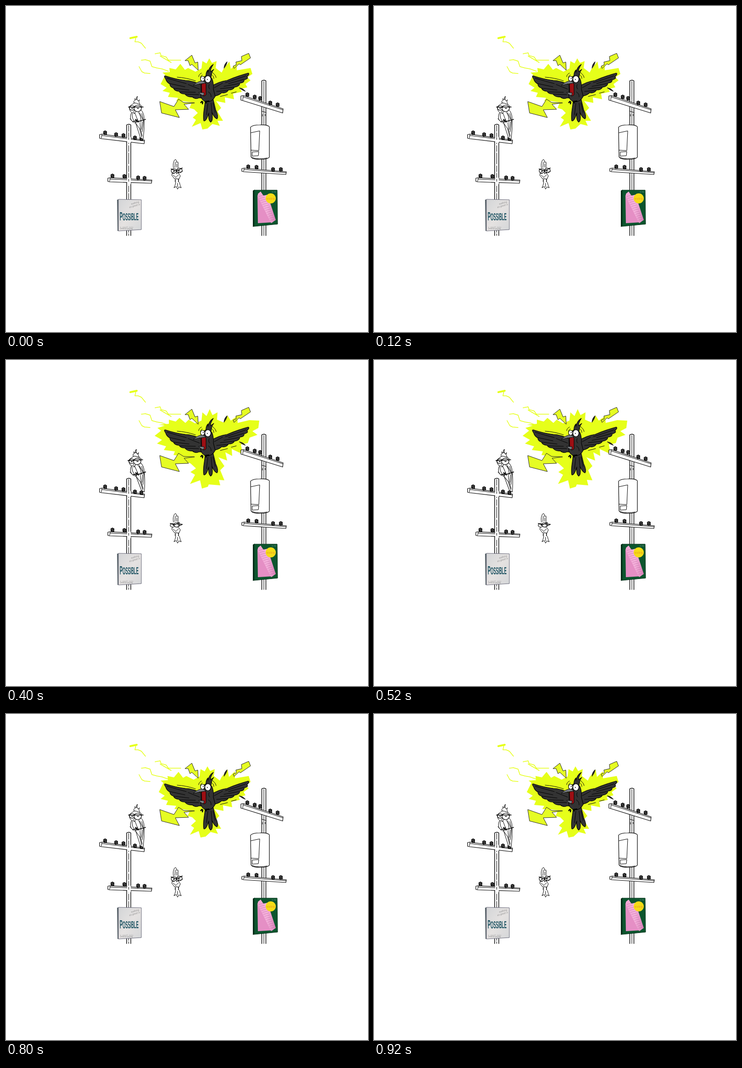
Recreate the animation shown at these times as an HTML page. Size 789 by 710 pixels, loop 1 s.

```html
<!DOCTYPE html>
<html lang="en">
<head>
<meta charset="utf-8">
<title>Shock on the wire</title>
<style>
html, body { margin: 0; width: 100%; height: 100%; overflow: hidden; background: #fff; }
svg { display: block; width: 100vw; height: 100vh; }
.ink { fill: #fff; stroke: #000; stroke-width: 1.2; stroke-linejoin: round; stroke-linecap: round; }
.line { fill: none; stroke: #000; stroke-width: 1; stroke-linejoin: round; stroke-linecap: round; }
.dark { fill: #333; stroke: #000; stroke-width: 1.1; stroke-linejoin: round; }
.bolt { fill: #e5fc24; stroke: #222; stroke-width: 1; }
.spark { fill: none; stroke: #e6ff1a; stroke-width: 1.5; stroke-linejoin: round; stroke-linecap: round; }
.flash { fill: #e6ff1a; }
</style>
</head>
<body>
<svg viewBox="0 0 789 710" preserveAspectRatio="none">
<defs>
  <linearGradient id="paper" x1="0" y1="0" x2="1" y2="1">
    <stop offset="0" stop-color="#d3d5d7"/><stop offset=".5" stop-color="#e5e2e1"/><stop offset="1" stop-color="#d4d6d8"/>
  </linearGradient>
  <linearGradient id="roll" x1="0" y1="0" x2="1" y2="0">
    <stop offset="0" stop-color="#f3a6d4"/><stop offset=".5" stop-color="#f5b2dc"/><stop offset="1" stop-color="#d981b8"/>
  </linearGradient>
  <g id="cap">
    <path d="M-4-3 0-5 4-3 4 4-2 5-4 2Z" fill="#151515"/>
    <path d="M-3-1 2-2M-1 2 3 1" stroke="#aaa" stroke-width=".7"/>
  </g>
</defs>

<g id="flashes">
  <path class="flash" d="M347 150 341 145 357 144 356 135 370 138 380 126 390 139 397 135 413 143 426 136 428 120 437 125 443 114 449 124 459 120 457 135 470 145 474 137 487 121 490 137 503 125 503 140 533 135 537 148 526 155 533 162 522 170 526 177 511 181 514 187 495 191 497 203 477 199 478 211 458 207 469 222 461 230 473 250 461 250 466 261 450 257 439 267 428 269 424 255 405 263 414 248 407 243 418 233 410 225 400 222 405 210 384 207 371 207 375 200 353 198 357 189 341 185 350 178 337 170Z"/>
  <path class="flash" d="M338 154 330 148 346 143 333 141 355 139 355 130 370 134 378 126 391 137 398 130 412 138 426 132 428 114 437 122 444 107 450 120 461 114 460 130 474 136 483 121 490 132 504 122 505 137 530 131 552 132 550 148 537 155 548 163 531 169 527 181 512 184 516 205 492 194 493 209 478 201 482 219 463 212 476 231 467 240 476 262 464 261 467 273 442 271 440 276 427 280 423 262 401 270 412 250 402 244 414 236 402 225 382 219 386 209 365 207 368 199 344 196 349 188 329 182 340 174 324 165Z"/>
</g>

<g id="calm"></g>

<g id="poles"></g>

<g id="leftPoster">
  <path d="M242 422 246 421 246 490 243 490Z" fill="#59646a"/>
  <path d="M245 421 295 422 295 487 245 490Z" fill="url(#paper)" stroke="#667" stroke-width="1"/>
  <g fill="#1c5261" font-family="'Liberation Sans', Arial, sans-serif">
    <g font-family="'Liberation Serif', serif" font-style="italic" font-size="6" fill="#888">
      <text transform="translate(273 433) rotate(-16)">nothing</text>
      <text transform="translate(269 440) rotate(-16)">as good is</text>
    </g>
    <text transform="translate(248 467) rotate(-1) scale(.72 2)" font-size="13" font-weight="bold">P<tspan font-size="11">OSSIBLE</tspan></text>
    <text x="249" y="483" font-size="3.2" fill="#777" letter-spacing="1">a small note</text>
    <text x="249" y="486" font-size="3" fill="#777">printed for every day</text>
  </g>
</g>

<g id="rightPoster">
  <path d="M538 402 542 400 542 480 538 481Z" fill="#052b18"/>
  <path d="M541 401 591 401 592 475 541 480Z" fill="#0c552e" stroke="#06321b" stroke-width="1"/>
  <path d="M548 411 549 473 582 471Z" fill="#e58fc5"/>
  <path d="M549 409 555 404 561 413 570 411 588 466 578 473 549 415Z" fill="url(#roll)"/>
  <path id="stripes" fill="none" stroke="#c66fa9" stroke-width=".7"/>
  <circle cx="577" cy="419" r="11" fill="#f5dc16"/>
  <text x="577" y="422" font-family="'Liberation Sans', Arial, sans-serif" font-size="8" text-anchor="middle" fill="#e69b24">extra</text>
  <text x="579" y="406" font-family="'Liberation Sans', Arial, sans-serif" font-size="3" fill="#8aa">no. four</text>
</g>

<g id="perch"></g>
<g id="chick"></g>

<g id="sparks">
  <g class="spark">
    <path d="M271 70 285 67" stroke-width="4"/>
    <path d="M283 69 281 78 288 78 295 81 304 92M325 104 336 102 338 108 349 111 354 118 381 118M336 109 360 123M295 118 304 117 314 120 318 132 329 135 340 137 354 142M290 132 296 143 302 146 314 147"/>
  </g>
  <g class="spark">
    <path d="M295 81 304 96 306 82" stroke-width="2.2"/>
    <path d="M300 100 306 97 319 103 336 103 345 107 355 109 362 115 377 121M342 107 355 117 366 123 374 130 385 134M279 110 286 108 290 117 297 115 302 122 313 121 319 124 321 133 331 136 339 135 345 143 355 144 367 156" stroke-width="1.8"/>
  </g>
</g>

<g id="bolts">
  <g class="bolt">
    <path d="M390 119 405 107 412 124 418 122 419 140 405 127 401 130 397 119Z"/>
    <path d="M513 110 529 103 533 113 511 128 508 126 497 136 495 131 502 128 501 122 514 119Z"/>
    <path d="M335 208 366 219 376 203 387 210 411 211 388 214 398 225 369 226 378 243 339 233Z"/>
  </g>
  <g class="bolt">
    <path d="M373 104 389 87 397 107 402 102 403 118 396 112 391 116 388 103 378 109Z"/>
    <path d="M524 99 554 91 556 104 533 110 529 107 510 118 503 122 507 109 513 112 516 103 524 105Z"/>
    <path d="M340 258 363 255 369 241 364 241 371 229 407 222 385 238 402 239 369 255 393 264 353 275Z"/>
  </g>
</g>

<g id="crow">
  <path class="dark" d="M434 202C434 220 428 235 431 250Q436 253 442 233Q440 248 446 253Q452 250 449 232Q454 244 460 246Q464 240 457 226L451 201Z"/>
  <path class="line" d="M440 212 437 237M447 211 449 234M451 211 456 232"/>
  <path class="dark" d="M430 174Q407 162 391 162Q371 160 347 152Q343 152 348 159Q350 166 357 170Q357 176 365 179Q367 185 377 186Q381 192 390 192Q395 199 406 198Q413 204 421 200L435 202Z"/>
  <path class="line" d="M351 157Q373 164 393 169M357 169 390 176M366 179 399 183M379 187 413 188M391 192 420 193M397 171 422 181"/>
  <path class="dark" d="M443 177Q464 164 482 162Q502 153 528 146Q532 148 525 154Q530 158 519 161Q520 167 510 168Q509 175 498 177Q495 183 485 183Q480 191 470 189Q463 196 449 197Z"/>
  <path class="line" d="M523 152Q501 160 478 167M518 160 485 169M508 169 475 175M497 177 467 180M484 184 459 186M472 168 454 178"/>
  <path class="dark" d="M425 169Q429 153 438 151L449 158Q453 168 452 181L456 197Q449 210 435 209Q422 202 425 190Z"/>
  <path class="dark" d="M436 152Q435 145 440 139L440 145Q443 132 452 127Q445 138 446 143L453 138Q447 145 447 157Z"/>
  <path d="M426 170Q434 165 436 170L436 193Q431 199 427 193Z" fill="#9d0f13" stroke="#000"/>
  <path d="M408 173Q419 163 429 163L436 168Q422 169 408 173ZM420 188 432 189 431 195Q425 195 420 188Z" fill="#777c80" stroke="#000" stroke-width=".9"/>
  <path class="line" d="M443 171Q440 177 444 181M441 187Q448 191 447 198"/>
  <ellipse class="ink" cx="428.500" cy="158.500" rx="4.500" ry="5.500"/>
  <ellipse class="ink" cx="440" cy="159.500" rx="6.500" ry="7.500"/>
  <path d="M429 158h1.500M438 160h1.500" stroke="#000" stroke-width="2"/>
  <path d="M428 207 424 211M429 208 428 214M434 207 437 212M435 208 443 207" stroke="#000" stroke-width="2.500"/>
  <path d="M475 136Q475 127 482 121Q482 127 475 136ZM508 178Q517 179 522 186Q515 184 508 178Z" fill="#222" stroke="#111" stroke-width=".7"/>
</g>
<path id="shake" class="line" d="M373 155Q392 156 413 163M420 154Q420 149 426 146M424 156Q424 152 428 150M447 149Q453 152 453 158M450 145Q457 150 458 156M467 197 483 193M491 190 502 187"/>
</svg>

<script>
const $ = id => document.getElementById(id);
const path = (d, cls = 'line', extra = '') => `<path class="${cls}" d="${d}" ${extra}/>`;
const caps = (...spots) => spots.map(([x, y]) => `<use href="#cap" x="${x}" y="${y}"/>`).join('');

// A beam has a lit front face, a left end and a double top edge.
function beam(x, y, x2, y2, h) {
  return path(`M${x} ${y} ${x + 5} ${y - 1} ${x2} ${y2} ${x2 - 1} ${y2 + h} ${x + 4} ${y + h + 1} ${x} ${y + h}Z`, 'ink', 'stroke-width="1.5"') +
    path(`M${x + 5} ${y}l-1 ${h}M${x + 5} ${y + 2}L${x2 - 1} ${y2 + 2}`);
}

function post(x, top, gaps) {
  return path(`M${x} ${top + 1}L${x + 4} ${top}L${x + 9} ${top + 2}V500H${x}Z`, 'ink', 'style="stroke:none"') +
    path(`M${x} 500V${top + 1}Q${x + 5} ${top - 2} ${x + 9} ${top + 1}V500`, 'line', 'style="stroke-width:1.4"') +
    path(`M${x + 4.5} ${top + 2}V500`, 'line', `stroke-dasharray="${gaps}"`);
}

$('poles').innerHTML =
  post(263, 258, '13 3 24 4') + beam(204, 280, 302, 292, 8) + beam(222, 375, 318, 379, 7) +
  '<path d="M264 285h8v13h-8ZM264 374h8v14h-8Z" fill="#fff"/>' +
  path('M267.500 286v5M267.500 377v5') +
  caps([216, 276], [240, 280], [256, 282], [281, 287], [295, 289], [232, 370], [258, 371], [288, 374], [302, 375]) +
  post(557.5, 162, '40 1 60 1') + beam(512, 196, 604, 224, 9) + beam(514, 354, 611, 361, 6) +
  path('M533 264Q537 259 553 259Q570 258 574 263V329Q571 334 553 334Q536 334 534 328Z', 'ink') +
  path('M534 276 553 272 551 315 534 314M537 318 551 317 550 326 537 327ZM536 330Q551 335 569 331') +
  path('M559 236v4M565 236v3M557 229l10 3') +
  caps([526, 193], [542, 198], [554, 201], [576, 211], [592, 215], [528, 350], [546, 351], [582, 356], [599, 356]);

let bars = '';
for (let i = 0; i < 13; i++) bars += `M${550 + i * 2.2} ${415 + i * 4.3}l${12 - i * .1} -3`;
$('stripes').setAttribute('d', bars);

const perchBody =
  path('M280 213Q276 207 282 205L280 202 285 204Q282 198 287 197Q284 203 288 207L291 204Q288 209 292 214') +
  path('M280 211 270 218Q267 222 271 229L274 232Q269 239 273 249L283 256 293 287 299 290Q302 266 301 246Q301 233 294 226L296 218Q290 212 280 211Z', 'ink', 'style="stroke-width:1"') +
  path('M276 231Q273 239 278 249L284 255M281 233 287 249M288 231Q295 239 294 252M296 234 300 252M291 232 298 247M284 257 291 267 296 286M292 253 293 268 297 283M297 252 295 269M300 250 297 274M274 250 270 245') +
  path('M276 252 283 250 290 251 304 247M282 247 288 253M286 247 283 254', 'line', 'style="stroke-width:1.8"');
const perchEyes = [
  '<ellipse class="ink" cx="275" cy="222" rx="6" ry="5"/><ellipse class="ink" cx="287" cy="223" rx="8" ry="7"/>' +
    path('M267 220 280 221M278 220 299 220M274 223h2M286 223h3', 'line', 'style="stroke-width:1.7"') +
    path('M280 227Q277 231 279 235L283 230'),
  '<ellipse class="ink" cx="286" cy="223" rx="7" ry="7"/>' +
    path('M264 220 303 221M285 224h3', 'line', 'style="stroke-width:1.7"') +
    path('M280 222 271 224 279 228')
];
const chickBody =
  path('M365 353Q363 343 367 336Q371 331 372 341Q376 336 375 346L375 354M368 352 369 340M372 351 372 344') +
  path('M364 363 361 368 367 376 377 377 380 370 375 363M364 368 371 374M376 368 371 372') +
  path('M369 378 369 383M376 377 376 383', 'line', 'style="stroke-width:1.5"') +
  path('M370 384Q369 391 366 396L371 393 374 399 377 394 382 396Q379 391 378 384M374 386 374 394');
const chickFace = [
  '<ellipse class="ink" cx="366" cy="359" rx="6" ry="4.500"/><ellipse class="ink" cx="378" cy="358" rx="6" ry="5"/>' +
    path('M360 355 371 359 384 353M365 360h2M376 359h2', 'line', 'style="stroke-width:1.8"') +
    path('M371 360 372 366 376 361M361 364 367 365M375 364 385 360'),
  '<ellipse class="ink" cx="363" cy="360" rx="5" ry="4"/><ellipse class="ink" cx="372" cy="359" rx="6" ry="5"/>' +
    path('M358 356 367 359 378 354M364 360h2M374 358h2', 'line', 'style="stroke-width:1.6"') +
    path('M376 356 385 358 373 364M375 360 383 358')
];

// Each pose holds for one beat: glow, perch tilt and the two faces.
const beats = [
  { shock: 1, glow: 0, perch: '', one: 0, chick: 0 },
  { shock: 0, glow: -1, perch: 'translate(-1 -2) rotate(-3 285 222)', one: 0, chick: 0 },
  { shock: 1, glow: 1, perch: 'translate(-1 -2) rotate(-3 285 222)', one: 0, chick: 1 },
  { shock: 0, glow: -1, perch: 'translate(-6 1)', one: 1, chick: 1 },
  { shock: 1, glow: 0, shift: 'translate(-4 0)', perch: '', one: 0, chick: 0 }
];

function only(group, index) {
  [...group.children].forEach((el, i) => el.style.display = i === index ? '' : 'none');
}

let shown = -1;
function draw(time) {
  const n = Math.floor(time % 1000 / 200);
  if (n !== shown) {
    shown = n;
    const b = beats[n];
    only($('flashes'), b.glow);
    $('flashes').setAttribute('transform', b.shift || '');
    only($('sparks'), 1 - b.shock);
    only($('bolts'), 1 - b.shock);
    $('crow').setAttribute('transform', b.shock ? '' : 'rotate(-5 437 180)');
    $('shake').style.display = b.shock ? '' : 'none';
    $('perch').innerHTML = perchBody + perchEyes[b.one];
    $('perch').setAttribute('transform', b.perch);
    $('chick').innerHTML = chickBody + chickFace[b.chick];
  }
}

const start = performance.now();
function tick() {
  draw(performance.now() - start);
  requestAnimationFrame(tick);
}
draw(0);
requestAnimationFrame(tick);
</script>
</body>
</html>
```
